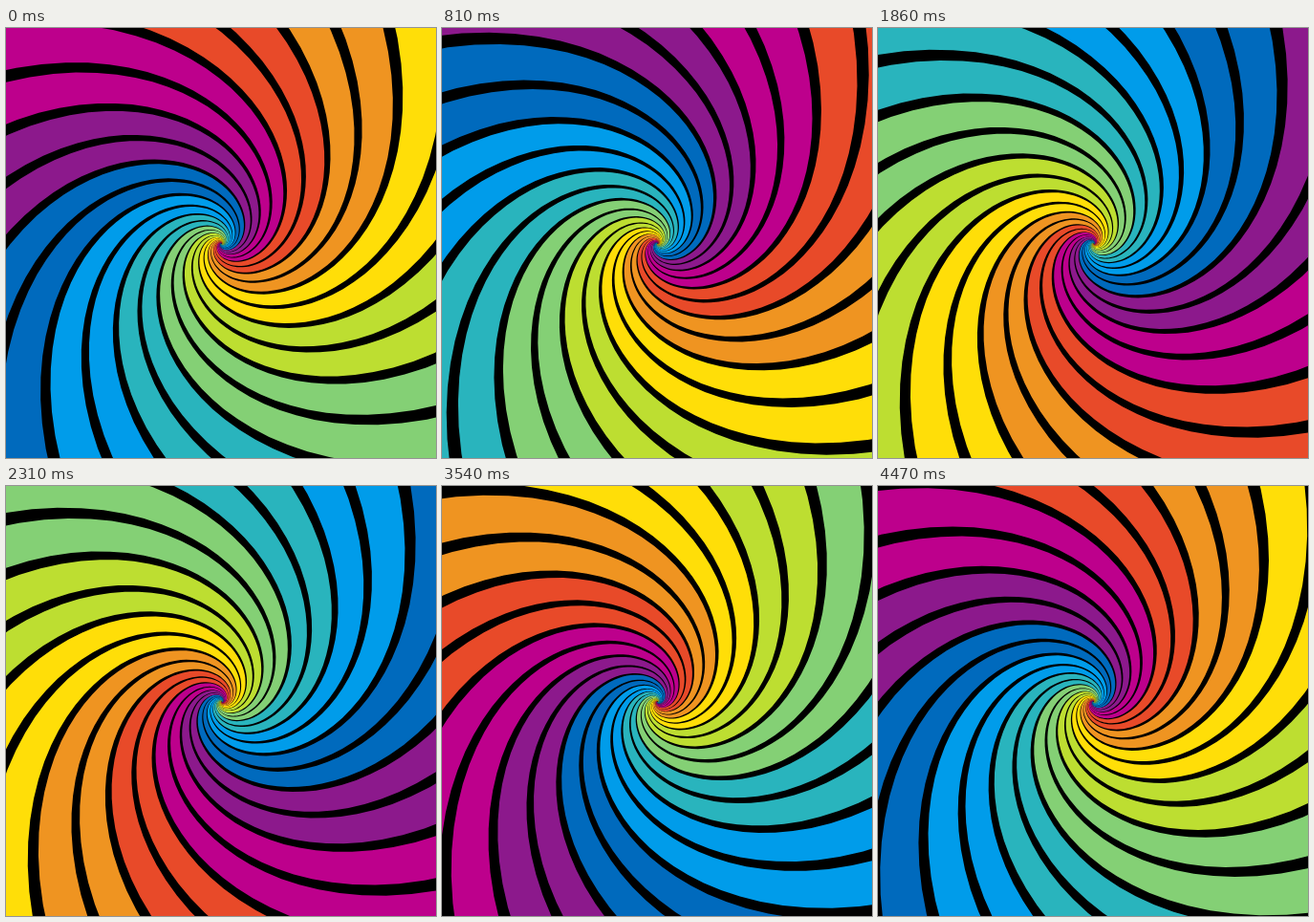
Write an HTML page that moves like this. It is 450 by 450 pixels and loops after 4.5 s.

```html
<!DOCTYPE html>
<html lang="en">
<head>
<meta charset="utf-8">
<title>Rainbow spiral</title>
<style>
  html, body { margin: 0; width: 100%; height: 100%; overflow: hidden; background: #000; }
  svg { display: block; width: 100vw; height: 100vh; }
</style>
</head>
<body>
<svg viewBox="0 0 450 450">
  <rect width="450" height="450" fill="#000"/>
  <g id="wheel"></g>
</svg>
<script>
const LOOP = 4500, STEP = 30;
const CENTER = 225.7, GROWTH = 0.812;
const START = 168.9, ARM = 18, GAP = 4;   // degrees
const R_MIN = 0.4, R_MAX = 340, POINTS = 110;

// clockwise, two arms of each colour
const COLORS = ['#006abd', '#8c198c', '#bd008c', '#e84a29', '#ef9421',
                '#ffde08', '#bdde31', '#84d075', '#29b4bd', '#009cea'];

const wheel = document.getElementById('wheel');
const rad = deg => deg * Math.PI / 180;

// the black gap narrows close to the centre
const gapAt = r => GAP * Math.min(1, r / 18);

// logarithmic spiral, opening counterclockwise
function point(r, deg) {
  const a = rad(deg) - Math.log(r) / GROWTH;
  return (r * Math.cos(a)).toFixed(2) + ' ' + (r * Math.sin(a)).toFixed(2);
}

function armPath(start) {
  const lead = [], trail = [];
  for (let i = 0; i <= POINTS; i++) {
    const r = R_MIN * Math.pow(R_MAX / R_MIN, i / POINTS);
    const extra = (GAP - gapAt(r)) / 2;
    lead.push(point(r, start - extra));
    trail.unshift(point(r, start + ARM - GAP + extra));
  }
  return 'M' + lead.concat(trail).join('L') + 'Z';
}

for (let i = 0; i < 2 * COLORS.length; i++) {
  const path = document.createElementNS('http://www.w3.org/2000/svg', 'path');
  path.setAttribute('d', armPath(START + ARM * i));
  path.setAttribute('fill', COLORS[i >> 1]);
  wheel.appendChild(path);
}

function draw(ms) {
  const tick = Math.floor((ms % LOOP) / STEP);
  const turn = tick * 360 * STEP / LOOP;
  wheel.setAttribute('transform', `translate(${CENTER} ${CENTER}) rotate(${turn.toFixed(2)})`);
}

const begin = performance.now();
function frame() {
  draw(performance.now() - begin);
  requestAnimationFrame(frame);
}
draw(0);
requestAnimationFrame(frame);
</script>
</body>
</html>
```
